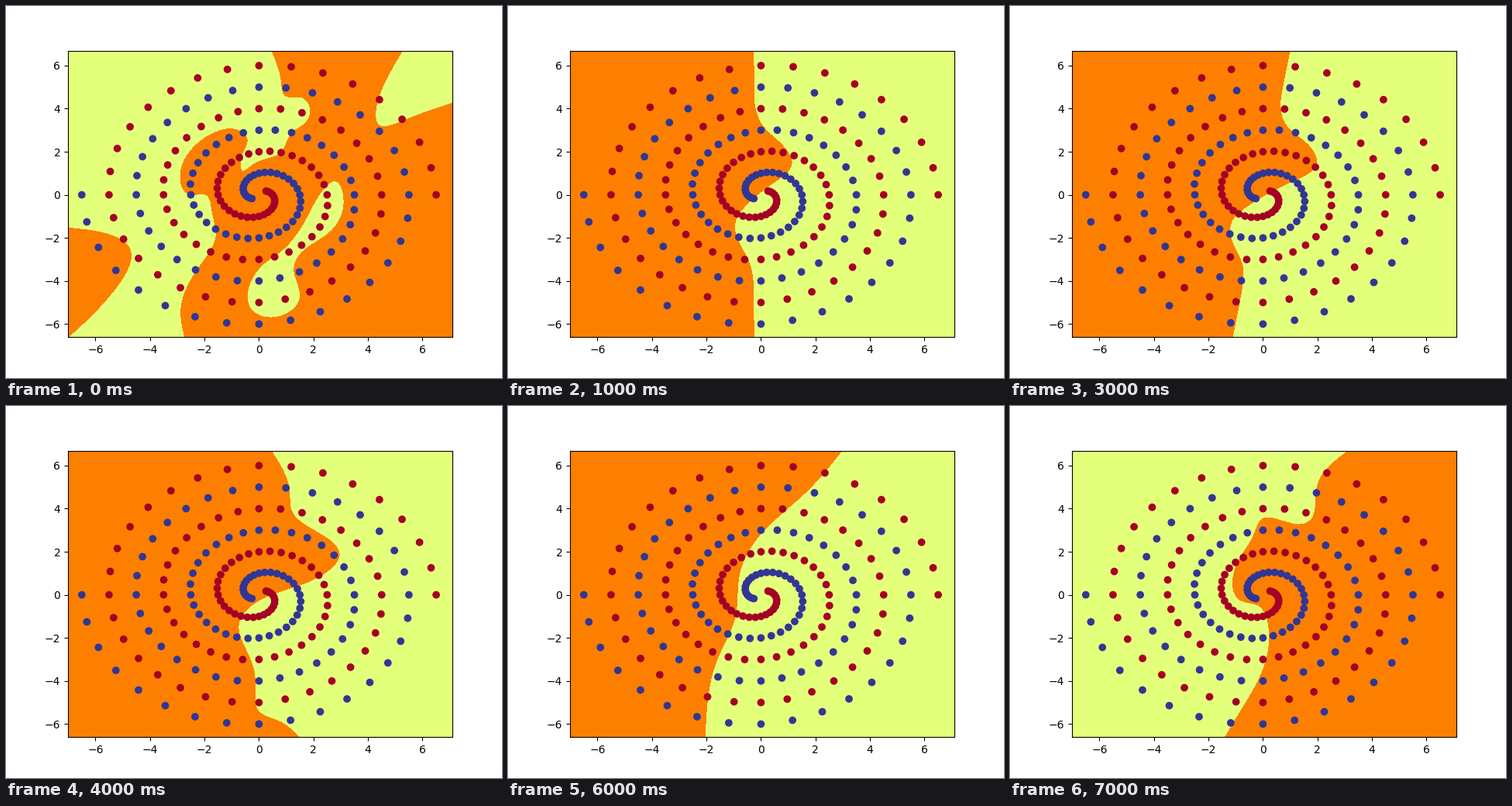
Write a matplotlib script that moves like this. It is 640 by 480 pixels and loops after 8000 ms.

```python
import numpy as np
import matplotlib.pyplot as plt
from matplotlib.animation import FuncAnimation
from matplotlib.patches import Polygon

YELLOW, ORANGE = "#e4ff7a", "#fc7f00"
RED, BLUE = "#a50026", "#313695"
XLIM, YLIM = (-7.005, 7.095), (-6.605, 6.695)

# Corners beyond the axes, used to close open boundaries (stage pixels)
TR, BL, BR = (610, 30), (40, 460), (610, 460)


def to_data(px):
    """Stage pixels (y down) to axes data units."""
    x = XLIM[0] + (px[:, 0] - 80) / 496 * (XLIM[1] - XLIM[0])
    y = YLIM[0] + (427.2 - px[:, 1]) / 369.6 * (YLIM[1] - YLIM[0])
    return np.column_stack([x, y])


def spline(pts, closed, samples=500):
    """Natural cubic spline through a few key points."""
    p = np.asarray(pts, float)
    count = len(p)
    if closed:
        p = np.vstack([p[-3:], p, p[:4]])
    h = np.hypot(*np.diff(p, axis=0).T) ** 0.7
    t = np.concatenate([[0], np.cumsum(h)])
    slope = np.diff(p, axis=0) / h[:, None]

    system, rhs = np.eye(len(p)), np.zeros_like(p)
    for i in range(1, len(p) - 1):
        system[i, i - 1:i + 2] = h[i - 1], 2 * (h[i - 1] + h[i]), h[i]
        rhs[i] = 6 * (slope[i] - slope[i - 1])
    m = np.linalg.solve(system, rhs)

    start, end = (t[3], t[3 + count]) if closed else (0, t[-1])
    u = np.linspace(start, end, samples)
    k = np.clip(np.searchsorted(t, u, "right") - 1, 0, len(h) - 1)
    a, b, w = (v[:, None] for v in (t[k + 1] - u, u - t[k], h[k]))
    return ((m[k] * a**3 + m[k + 1] * b**3) / (6 * w)
            + (p[k] / w - m[k] * w / 6) * a
            + (p[k + 1] / w - m[k + 1] * w / 6) * b)


def region(color, pts, *corners):
    """A filled region; without corners the curve closes on itself."""
    line = spline(pts, closed=not corners)
    if corners:
        line = np.vstack([line, corners])
    return Polygon(to_data(line), closed=True, fc=color, ec="none", lw=0,
                   antialiased=False, zorder=0.5, visible=False)


def bent_edge(mid, lean, bulge):
    """A top-to-bottom edge bulging right above the centre, left below it."""
    y = np.linspace(54, 432, 16)
    x = (mid - lean * (y - 243) + bulge * np.exp(-((y - 200) / 38) ** 2)
         - bulge / 2 * np.exp(-((y - 285) / 38) ** 2))
    return np.column_stack([x, y])


# Key points of the decision boundaries
swirl = [(342, 55), (355, 95), (361, 116), (382, 118), (393, 136), (383, 154),
         (368, 165), (355, 189), (322, 203), (305, 213), (303, 196), (311, 172),
         (298, 160), (266, 165), (236, 190), (225, 220), (235, 242), (259, 244),
         (266, 265), (271, 298), (246, 342), (226, 390), (232, 432)]
left_lobe = [(75, 286), (145, 300), (161, 318), (135, 372), (77, 430)]
corner = [(580, 123), (520, 144), (482, 153), (478, 135), (515, 54)]
hole = [(425, 227), (435, 250), (418, 290), (380, 318), (371, 343), (378, 378),
        (343, 401), (314, 385), (326, 341), (358, 315), (388, 275), (408, 240)]

claw = [(334, 54), (326, 95), (335, 145), (358, 174), (390, 183), (407, 210),
        (400, 250), (362, 267), (337, 258), (329, 240), (327, 212), (316, 206),
        (287, 225), (240, 236), (208, 225), (182, 199), (163, 196), (170, 224),
        (197, 243), (215, 250), (190, 257), (165, 280), (176, 314), (215, 330),
        (255, 313), (285, 303), (318, 317), (331, 345), (333, 370), (362, 370),
        (408, 343), (440, 306), (465, 310), (520, 364), (580, 433)]
wedge = [(580, 89), (531, 168), (522, 190), (538, 211), (580, 216)]

hook = [(341, 54), (366, 105), (371, 138), (418, 172), (431, 193), (408, 219),
        (358, 239), (322, 255), (301, 283), (321, 342), (326, 392), (355, 407),
        (383, 431)]

top_cup = [(348, 54), (353, 87), (370, 100), (400, 85), (434, 54)]
right_lobe = [(521, 54), (475, 125), (437, 192), (462, 215), (500, 193), (580, 126)]
spot = [(327, 137), (330, 145), (323, 153), (321, 144)]
basin = [(75, 134), (140, 173), (215, 216), (238, 238), (246, 288), (258, 305),
         (290, 295), (318, 309), (343, 316), (370, 302), (392, 268), (411, 249),
         (428, 276), (404, 314), (405, 350), (450, 390), (511, 432)]
low_lobe = [(231, 432), (250, 350), (252, 316), (212, 310), (165, 332), (75, 416)]

slope_edge = [(435, 54), (385, 112), (325, 168), (299, 220), (294, 272), (268, 335),
              (255, 432)]

step_edge = [(442, 54), (397, 102), (391, 143), (372, 153), (327, 145), (314, 168),
             (290, 212), (295, 249), (320, 257), (332, 275), (330, 330), (297, 395),
             (275, 432)]

# Background colour and regions, painted in order, for each second
scenes = [
    (YELLOW, [region(ORANGE, swirl, BR, TR), region(ORANGE, left_lobe, BL),
              region(YELLOW, corner, TR), region(YELLOW, hole)]),
    (ORANGE, [region(YELLOW, bent_edge(318, 0, 50), BR, TR)]),
    (ORANGE, [region(YELLOW, claw, BR, TR), region(ORANGE, wedge, (610, 150))]),
    (ORANGE, [region(YELLOW, bent_edge(325, 0.2, 65), BR, TR)]),
    (ORANGE, [region(YELLOW, hook, BR, TR)]),
    (ORANGE, [region(YELLOW, top_cup, (390, 30)), region(YELLOW, right_lobe, TR),
              region(YELLOW, spot), region(YELLOW, basin, BR, BL),
              region(ORANGE, low_lobe, BL)]),
    (ORANGE, [region(YELLOW, slope_edge, BR, TR)]),
    (YELLOW, [region(ORANGE, step_edge, BR, TR)]),
]

fig, ax = plt.subplots(figsize=(6.4, 4.8), dpi=100)
ax.set_xlim(*XLIM)
ax.set_ylim(*YLIM)
for _, parts in scenes:
    for part in parts:
        ax.add_patch(part)

# Two interleaved spirals, one the point reflection of the other
i = np.arange(100)
radius, angle = 6.5 * (104 - i) / 104, i * np.pi / 16
arm = np.column_stack([radius * np.cos(angle), radius * np.sin(angle)])
dots = np.stack([arm, -arm], axis=1).reshape(-1, 2)
ax.scatter(dots[:, 0], dots[:, 1], c=[RED, BLUE] * len(i), zorder=2)


def update(n):
    for k, (_, parts) in enumerate(scenes):
        for part in parts:
            part.set_visible(k == n)
    ax.set_facecolor(scenes[n][0])
    return []


anim = FuncAnimation(fig, update, frames=len(scenes), interval=1000,
                     repeat=True, repeat_delay=0)
plt.show()
```
